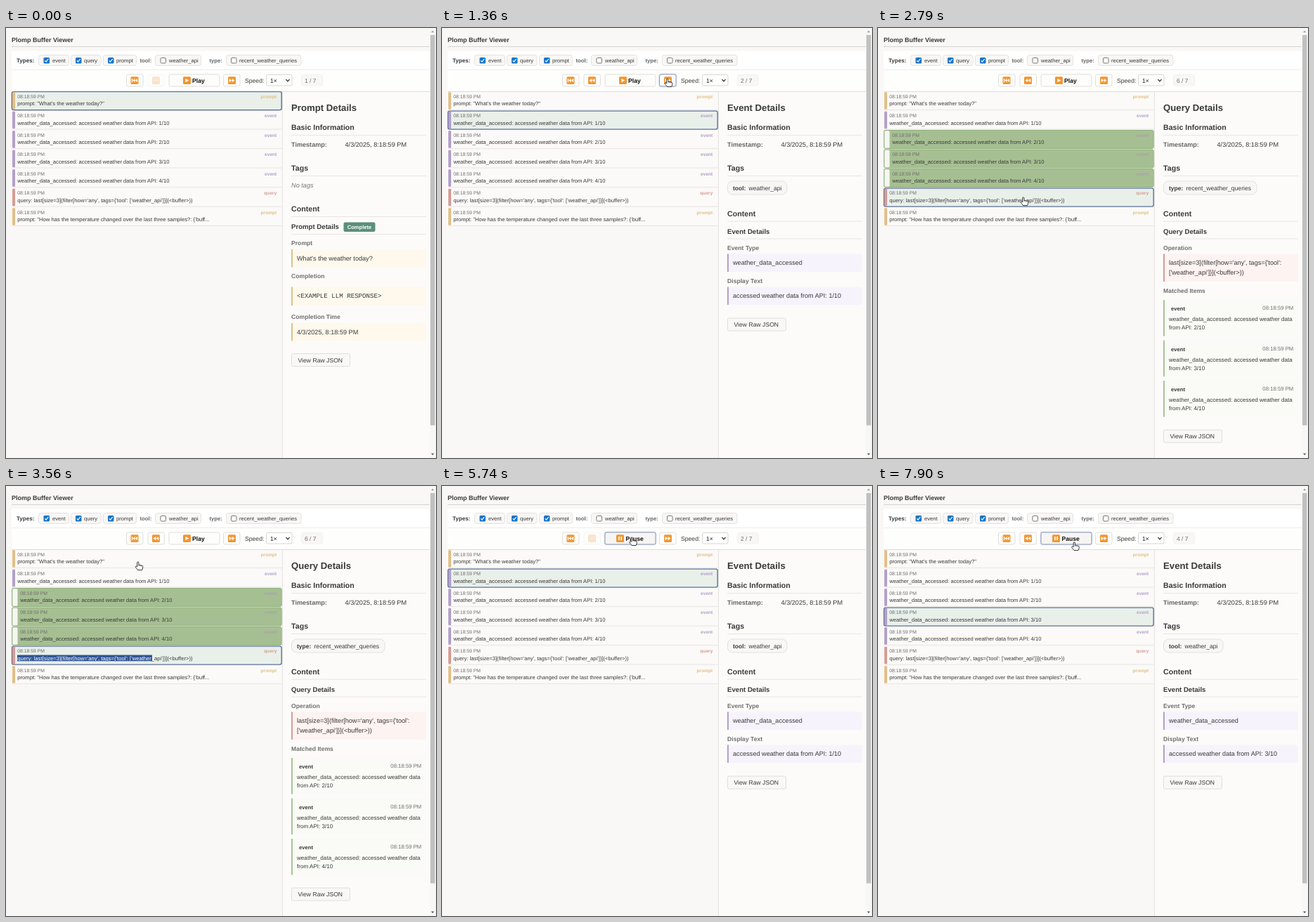
Write an HTML page with a canvas that moves like this. It is 612x612 px and loops after 8 s.

```html
<!DOCTYPE html>
<html lang="en">
<head>
<meta charset="utf-8">
<title>Buffer viewer</title>
<style>
html, body { margin: 0; width: 100%; height: 100%; overflow: hidden; background: #f9f8f6; }
canvas { display: block; width: 612px; height: 612px; }
</style>
</head>
<body>
<canvas id="stage"></canvas>
<script>
const SIZE = 612, LOOP = 8000;
const canvas = document.getElementById('stage');
const ratio = window.devicePixelRatio || 1;
canvas.width = canvas.height = SIZE * ratio;
const ctx = canvas.getContext('2d');
ctx.scale(ratio, ratio);
ctx.textRendering = 'geometricPrecision';

const SANS = '"Liberation Sans", Arial, sans-serif';
const MONO = '"Liberation Mono", monospace';
const INK = '#3a3a3a', MUTED = '#707070', ORANGE = '#f3962f';
const ACCENT = { prompt: '#e2bf88', event: '#b3a0c9', query: '#d69c94' };
const TINT = { prompt: '#fef9ec', event: '#f6f3fc', query: '#fdf3f1' };
const STAMP = '08:18:59 PM';

const apiText = n => `accessed weather data from API: ${n}/10`;
const eventText = n => 'weather_data_accessed: ' + apiText(n);
const rows = [
  { kind: 'prompt', text: 'prompt: "What\'s the weather today?"' },
  ...[1, 2, 3, 4].map(n => ({ kind: 'event', text: eventText(n) })),
  { kind: 'query', text: "query: last[size=3](filter[how='any', tags={'tool': ['weather_api']}](<buffer>))" },
  { kind: 'prompt', text: 'prompt: "How has the temperature changed over the last three samples?: {\'buff...' }
];

// [time, selected row]
const picks = [[0, 0], [1180, 1], [1710, 2], [2260, 5], [3960, 0], [5740, 1], [6700, 2], [7700, 3]];
// [time, x, y] of the pointer tip
const path = [
  [310, 330, 280], [790, 275.5, 69], [1090, 321, 72], [1710, 321, 72],
  [2030, 213.5, 240], [2260, 207, 241], [3130, 207, 241], [3560, 188, 108],
  [3830, 220, 102], [4280, 220, 102], [4710, 270.5, 73], [5740, 270.5, 73],
  [6170, 279.5, 80], [8000, 279.5, 80]
];

function text(str, x, y, size, { color = INK, style = '', align = 'left', font = SANS } = {}) {
  ctx.font = `${style} ${size}px ${font}`;
  ctx.fillStyle = color;
  ctx.textAlign = align;
  ctx.fillText(str, x, y);
}

const bold = (str, x, y, size, color = INK, align = 'left') =>
  text(str, x, y, size, { color, align, style: 'bold' });

function rect(x, y, w, h, color) {
  ctx.fillStyle = color;
  ctx.fillRect(x, y, w, h);
}

function box(x, y, w, h, r, fill, stroke, line = 1) {
  ctx.beginPath();
  ctx.roundRect(x, y, w, h, r);
  if (fill) { ctx.fillStyle = fill; ctx.fill(); }
  if (stroke) { ctx.strokeStyle = stroke; ctx.lineWidth = line; ctx.stroke(); }
}

function shape(points, color) {
  ctx.beginPath();
  points.forEach(([x, y]) => ctx.lineTo(x, y));
  ctx.closePath();
  ctx.fillStyle = color;
  ctx.fill();
}

function stroke(points, color, width) {
  ctx.beginPath();
  points.forEach(([x, y]) => ctx.lineTo(x, y));
  ctx.strokeStyle = color;
  ctx.lineWidth = width;
  ctx.stroke();
}

function chip(label, x, w, checkX, textX, checked) {
  box(x, 38.5, w, 15, 3, '#f8f7f5', '#e5e3df');
  if (checked) {
    box(checkX, 42, 8.5, 8.5, 1.5, '#1b73c9');
    stroke([[checkX + 1.8, 46.4], [checkX + 3.5, 48.2], [checkX + 6.8, 44]], '#fff', 1.2);
  } else {
    box(checkX + 0.5, 42.5, 7.5, 7.5, 1.5, '#fff', '#777');
  }
  text(label, textX, 48.8, 7.65);
}

function icon(type, x) {
  const y = 69.2, m = y + 5.4;
  const tri = (a, b) => shape([[x + a, m - 2.6], [x + b, m], [x + a, m + 2.6]], '#fff');
  const bar = (a, w) => rect(x + a, m - 2.6, w, 5.2, '#fff');
  box(x, y, 11, 10.8, 1.5, ORANGE);
  if (type === 'first') { bar(1.4, 1.1); tri(6, 2.7); tri(9.6, 6.2); }
  if (type === 'back') { tri(5.3, 1.4); tri(9.4, 5.5); }
  if (type === 'next') { tri(1.6, 5.5); tri(5.7, 9.6); }
  if (type === 'play') tri(3.4, 8.4);
  if (type === 'pause') { bar(3, 1.7); bar(6.3, 1.7); }
}

function control(x, w, iconX, type, { focus, disabled, hover } = {}) {
  ctx.globalAlpha = disabled ? 0.25 : 1;
  if (focus) box(x - 0.5, 65.5, w + 1, 18, 3, null, '#d3daea', 1.5);
  box(x, 66, w, 17, 2.5, hover ? '#f6f5f4' : '#fdfdfc', focus ? '#929bb4' : '#e0deda');
  icon(type, iconX);
  ctx.globalAlpha = 1;
}

function drawHeader(t, index) {
  const playing = t >= 4760;
  bold('Plomp Buffer Viewer', 8, 19.8, 9);
  rect(8, 26, 596, 1, '#d5d4d1');
  rect(8, 33, 596, 26, '#fff');
  rect(8, 59, 596, 1, '#eeedea');
  rect(8, 60, 596, 30, '#fefefd');
  rect(8, 90, 596, 1, '#dddcd8');

  bold('Types:', 15, 49, 8.05);
  chip('event', 46.5, 43, 53.5, 66, true);
  chip('query', 92.5, 42.5, 99, 111, true);
  chip('prompt', 138.5, 47, 145, 157, true);
  bold('tool:', 190.5, 48.8, 7.8, '#666');
  chip('weather_api', 212.5, 65, 219.5, 232, false);
  bold('type:', 289.5, 48.8, 7.65, '#666');
  chip('recent_weather_queries', 313.5, 106.5, 320, 332, false);

  control(171.5, 23.5, 177.5, 'first');
  control(202, 23.5, 208, 'back', { disabled: t < 1180 || (t >= 4800 && t < 5770) });
  control(232, 72, playing ? 248 : 252, playing ? 'pause' : 'play',
    { focus: playing, hover: playing || (t > 700 && t < 900) });
  bold(playing ? 'Pause' : 'Play', playing ? 261.5 : 265, 77.8, 8.65, '#111');
  control(309.5, 23.5, 316, 'next', { focus: t >= 1180 && t < 2260 });

  text('Speed:', 340, 77.8, 8.65);
  box(370.5, 66.5, 36.5, 15.5, 2, '#fff', '#d8d6d2');
  text('1×', 376, 77.8, 8.65, { color: '#222' });
  stroke([[398.5, 73.2], [401, 75.9], [403.5, 73.2]], '#222', 1.2);
  box(420.5, 66.5, 30, 15.5, 3, '#f8f7f5', '#f2f1ee');
  text(`${index + 1} / 7`, 425, 77.8, 8.5, { color: MUTED });
}

function drawRow(i, index, t) {
  const { kind, text: label } = rows[i];
  const selected = i === index;
  const matched = index === 5 && i >= 2 && i <= 4;
  const lifted = i === 0 && t >= 3960 && t < 4600;
  const y = 91 + 27.5 * i - (lifted ? 0.7 : 0);
  const indent = matched ? 4 : 0;

  if (matched) {
    box(8.5, y - 0.5, 383.7, 26, 2, '#a6bf92', '#93b47f');
    box(9.3, y + 0.3, 7.2, 24.4, 1.5, '#f6f7f2');
  } else {
    rect(9, y, 383.5, 24.5, '#fbfaf8');
    rect(9, y + 25, 383.5, 1, '#e9e8e5');
    if (selected) box(8.5, y - 0.4, 383.7, 26, 2.5, '#e9f0ea', '#60749d', 1.4);
    box(9, y + 0.3, 4, 24.4, selected ? [2, 0, 0, 2] : 1, ACCENT[kind]);
  }

  const x = 16.3 + indent, baseline = y + 19;
  text(STAMP, x, y + 8.5, 6.8, { color: '#6d6d6d' });
  bold(kind, 385.3, y + 8.5, 6.6, matched ? '#a7a1ac' : ACCENT[kind], 'right');
  text(label, x, baseline, 7.65);

  if (i === 5 && selected && t >= 3130) {
    ctx.save();
    ctx.beginPath();
    ctx.rect(16, baseline - 7.2, 192, 9.2);
    ctx.clip();
    rect(16, baseline - 7.2, 192, 9.2, '#2f5597');
    text(label, x, baseline, 7.65, { color: '#fff' });
    ctx.restore();
  }
}

function section(label, y) {
  bold(label, 406, y, 10.65);
  rect(406, y + 7, 192, 1, '#e6e5e1');
}

function field(label, value, labelY, top, height, kind, font = SANS) {
  bold(label, 406, labelY, 8.65, MUTED);
  box(406, top, 192, height, 2, TINT[kind]);
  rect(406, top, 2, height, ACCENT[kind]);
  value.forEach((line, i) => text(line, 414, top + 15.8 + 14 * i, 9.14, { font }));
}

function jsonButton(y) {
  box(406.5, y, 83, 18, 2, '#f9f8f6', '#e0deda');
  text('View Raw JSON', 415.5, y + 12.2, 8.65);
}

function tagPill(name, value, width) {
  box(406.5, 218, width, 19, 7, '#f8f7f5', '#e3e1dd');
  bold(name, 414, 230.6, 8.5);
  text(value, name === 'tool:' ? 436.5 : 438.5, 230.6, 8.65);
}

function promptDetails() {
  text('No tags', 406, 227.3, 9.2, { color: '#777', style: 'italic' });
  section('Content', 261);
  bold('Prompt Details', 406, 286.3, 9.65);
  box(480.5, 276.5, 45, 13.5, 2.5, '#5b8f79');
  bold('Complete', 503, 286, 7.57, '#fff', 'center');
  rect(406, 293, 192, 1, '#e6e5e1');
  field('Prompt', ["What's the weather today?"], 309, 315, 25.5, 'prompt');
  field('Completion', ['<EXAMPLE LLM RESPONSE>'], 356.3, 368.5, 26.5, 'prompt', MONO);
  field('Completion Time', ['4/3/2025, 8:18:59 PM'], 413.8, 420, 25.5, 'prompt');
  jsonButton(463.5);
}

function eventDetails(n) {
  tagPill('tool:', 'weather_api', 84.5);
  field('Event Type', ['weather_data_accessed'], 315.6, 321.5, 25.5, 'event');
  field('Display Text', [apiText(n)], 362.8, 368.5, 25.5, 'event');
  jsonButton(413);
}

function queryDetails() {
  tagPill('type:', 'recent_weather_queries', 132.5);
  field('Operation', ["last[size=3](filter[how='any', tags={'tool':", "['weather_api']}](<buffer>))"],
    315.6, 321.5, 39.5, 'query');
  bold('Matched Items', 406, 376.6, 8.65, MUTED);
  for (let i = 0; i < 3; i++) {
    const y = 387 + 57.5 * i;
    box(406, y, 192, 51.5, 2, '#fafaf7');
    rect(406, y, 2, 51.5, '#a9c497');
    bold('event', 417, y + 15, 7.65);
    text(STAMP, 591.3, y + 14, 7.75, { color: MUTED, align: 'right' });
    text('weather_data_accessed: accessed weather data', 414, y + 30.2, 8.12);
    text(`from API: ${i + 2}/10`, 414, y + 42, 8.12);
  }
  jsonButton(572);
}

function drawDetails(index) {
  const { kind } = rows[index];
  const name = kind[0].toUpperCase() + kind.slice(1);
  rect(393, 91, 210, 521, '#fcfbf9');
  rect(393, 91, 1, 521, '#e4e3df');
  bold(name + ' Details', 406, 118.2, 13.2);
  section('Basic Information', 145.2);
  bold('Timestamp:', 406, 169.3, 9.1, '#666');
  text('4/3/2025, 8:18:59 PM', 482.5, 169.3, 9.16);
  section('Tags', 203);
  if (kind === 'prompt') return promptDetails();
  section('Content', 267.6);
  bold(name + ' Details', 406, 292.8, 9.65);
  rect(406, 299.5, 192, 1, '#e6e5e1');
  kind === 'event' ? eventDetails(index) : queryDetails();
}

function drawScrollbar() {
  rect(603, 0, 9, 612, '#f7f7f6');
  rect(604, 10, 6.5, 555.5, '#c0c0c0');
  shape([[605, 6.2], [607.2, 3.8], [609.4, 6.2]], '#9a9a9a');
  shape([[605, 605.5], [607.2, 608], [609.4, 605.5]], '#555');
}

function pointerAt(t) {
  const next = path.findIndex(p => p[0] > t);
  if (next < 1) return null;
  const [t0, x0, y0] = path[next - 1], [t1, x1, y1] = path[next];
  const k = (t - t0) / (t1 - t0), ease = k * k * (3 - 2 * k);
  return [x0 + (x1 - x0) * ease, y0 + (y1 - y0) * ease];
}

function drawPointer(t) {
  const at = pointerAt(t);
  if (!at) return;
  ctx.save();
  ctx.translate(...at);
  ctx.lineJoin = 'round';
  const hand = new Path2D('M-1.3 7V1Q-1.3 0 -.2 0T.9 1V4.6Q2.1 3.7 2.9 4.9Q4 4.1 4.8 5.3Q6.5 4.8 6.7 6.4' +
    'V8.4Q6.5 10 5.6 11.6H-.5Q-1.5 9.8 -3.6 7.7Q-4.2 6.6 -3.2 6.2T-1.3 7Z');
  ctx.fillStyle = '#fff';
  ctx.fill(hand);
  ctx.strokeStyle = '#222';
  ctx.lineWidth = 0.9;
  ctx.stroke(hand);
  for (const x of [0.9, 2.9, 4.8]) stroke([[x, 4.8], [x, 6.4]], '#222', 0.5);
  ctx.restore();
}

function draw(now) {
  const t = now % LOOP;
  const index = picks.filter(p => p[0] <= t).pop()[1];
  rect(0, 0, SIZE, SIZE, '#f9f8f6');
  drawDetails(index);
  rows.forEach((_, i) => drawRow(i, index, t));
  drawHeader(t, index);
  // The selected first row overlaps the toolbar edge.
  if (index === 0) drawRow(0, index, t);
  drawScrollbar();
  drawPointer(t);
}

let start;
function tick(now) {
  start ??= now;
  draw(now - start);
  requestAnimationFrame(tick);
}
draw(0);
requestAnimationFrame(tick);
</script>
</body>
</html>
```
